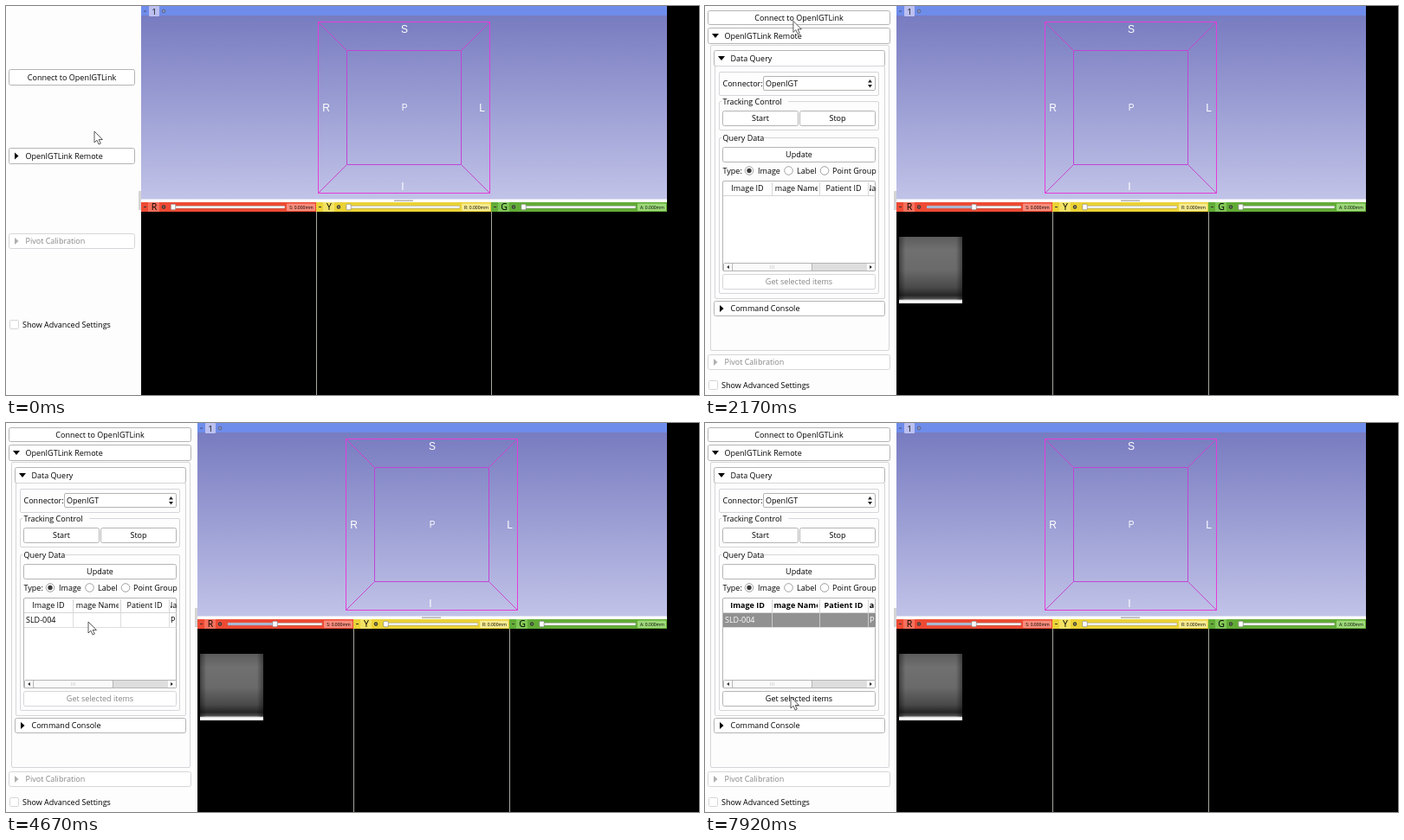
Recreate the animation shown at these times as an HTML page. Size 800 px wide and 450 px high, loop 8000 ms.

```html
<!DOCTYPE html>
<html lang="en">
<head>
<meta charset="utf-8">
<style>
html, body { margin: 0; width: 100%; height: 100%; overflow: hidden; background: #000; }
svg { display: block; width: 100vw; height: 100vh; }
text { font-family: "Open Sans", "Noto Sans", sans-serif; font-size: 9px; fill: #000; white-space: pre; }
.mid { text-anchor: middle; }
.off { fill: #858585; }
.bold { font-weight: 700; }
.lit { fill: #fff; }
.view { font-family: "Liberation Sans", Arial, sans-serif; font-size: 12px; fill: #fff; text-anchor: middle; }
.back { font-size: 10px; }
.letter { font-size: 10.5px; }
.tiny { font-size: 5px; text-anchor: middle; }
</style>
</head>
<body>
<svg viewBox="0 0 800 450" xmlns="http://www.w3.org/2000/svg">
  <defs>
    <linearGradient id="sky" x2="0" y2="1">
      <stop offset="0" stop-color="#7478be"/>
      <stop offset="1" stop-color="#c1c3e8"/>
    </linearGradient>
    <linearGradient id="scan" x2="0" y2="1">
      <stop offset="0" stop-color="#5c5c5c"/>
      <stop offset=".2" stop-color="#707070"/>
      <stop offset=".5" stop-color="#6a6a6a"/>
      <stop offset=".76" stop-color="#4a4a4a"/>
      <stop offset=".88" stop-color="#262626"/>
      <stop offset=".93" stop-color="#505050"/>
      <stop offset=".96" stop-color="#fff"/>
    </linearGradient>
    <linearGradient id="edge">
      <stop offset="0" stop-opacity=".4"/>
      <stop offset=".1" stop-opacity="0"/>
      <stop offset=".9" stop-opacity="0"/>
      <stop offset="1" stop-opacity=".4"/>
    </linearGradient>
    <clipPath id="stage"><rect width="763" height="450"/></clipPath>
    <clipPath id="narrow"><rect width="147" height="450"/></clipPath>
    <clipPath id="table"><rect x="20" y="202" width="177" height="106"/></clipPath>
    <clipPath id="heads">
      <rect x="80" y="203" width="50" height="16"/>
      <rect x="190" y="203" width="7" height="16"/>
    </clipPath>
  </defs>
  <g id="views" clip-path="url(#stage)"></g>
  <g id="panel"></g>
  <path id="cursor" d="M0 0V13L3 10.2L5.1 15L7.3 14L5.2 9.5H9.4Z" fill="#fff" stroke="#333" stroke-width=".8"/>
</svg>
<script>
const LOOP = 8000, STEP = 1000 / 12;
const LINE = '#b4b4b4', FAINT = '#d6d6da', PAPER = '#fdfdfd';
const $ = id => document.getElementById(id);

const rect = (x, y, r, b, fill, extra = '') =>
  `<rect x="${x}" y="${y}" width="${r - x}" height="${b - y}" fill="${fill}" ${extra}/>`;
const box = (x, y, r, b, stroke = LINE, fill = 'none', rx = 1.5) =>
  rect(x + .5, y + .5, r - .5, b - .5, fill, `stroke="${stroke}" rx="${rx}"`);
const path = (d, stroke, width = 1) => `<path d="${d}" fill="none" stroke="${stroke}" stroke-width="${width}"/>`;
const text = (x, y, s, cls = '') => `<text x="${x}" y="${y}" class="${cls}">${s}</text>`;
const shape = (d, fill) => `<path d="${d}" fill="${fill}"/>`;
const dot = (x, y, r, fill, stroke = 'none') =>
  `<circle cx="${x}" cy="${y}" r="${r}" fill="${fill}" stroke="${stroke}"/>`;

function button(x, y, r, b, label, on = true) {
  return box(x, y, r, b, on ? LINE : FAINT, '#fff', 2) +
    text((x + r) / 2, (y + b) / 2 + 3.2, label, on ? 'mid' : 'mid off');
}

function fold(x, y, r, b, label, open, on = true) {
  const cx = x + 9, cy = (y + b) / 2;
  const d = open ? `M${cx - 4} ${cy - 2.5}h8l-4 5z` : `M${cx - 2} ${cy - 4}v8l4.5-4z`;
  return box(x, y, r, b, on ? LINE : FAINT, '#fff', 2) + shape(d, on ? '#000' : '#b0b0b0') +
    text(x + 19.5, cy + 3.2, label, on ? '' : 'off');
}

function group(y, b, title) {
  return box(16, y, 201, b, FAINT) +
    (title ? rect(19, y - 3, 21 + title.length * 4.7, y + 4, PAPER) + text(20.5, y + 4, title) : '');
}

const radio = (x, on) => dot(x, 190.5, 4.8, '#fff', '#a0a0a0') + (on ? dot(x, 190.5, 2.7, '#3c3c3c') : '');

function scroller(x, y, r, from, to) {
  const m = (from + to) / 2;
  return box(x, y, r, y + 10, LINE, '#dedede') +
    rect(x + 1, y + 1, x + 10, y + 9, '#fff') + rect(r - 10, y + 1, r - 1, y + 9, '#fff') +
    box(from, y, to, y + 10, LINE, '#fafafa') +
    path(`M${m - 2} ${y + 3}v4m2-4v4m2-4v4`, FAINT, .8) +
    shape(`M${x + 7} ${y + 3}v4l-3-2zM${r - 7} ${y + 3}v4l3-2z`, '#333');
}

function table(s) {
  const picked = s.row > 1, bold = picked ? 'bold' : '', cell = picked ? 'lit' : '';
  let out = box(20, 202, 197, 307, LINE, '#fff') +
    path('M21 219.5H197M77.5 204V219M132.5 204V219M188.5 204V219', FAINT) +
    text(49, 214, 'Image ID', 'mid ' + bold) + text(160, 214, 'Patient ID', 'mid ' + bold) +
    `<g clip-path="url(#heads)">${text(105, 214, 'Image Name', 'mid ' + bold)}` +
    `${text(picked ? 182.5 : 185.5, 214, 'Na', bold)}</g>`;
  if (s.row) {
    if (picked) out += rect(21, 220, 197, 236, s.row === 2 ? '#4a86b4' : '#919191');
    out += path('M21 236.5H197M77.5 220V236M132.5 220V236M188.5 220V236', FAINT, .8) +
      text(23, 231.3, 'SLD-004', cell) + text(190, 231.3, 'P', cell);
  }
  return `<g clip-path="url(#table)">${out}${scroller(21, 297, 197, 31, 124)}</g>`;
}

function query(s) {
  const on = s.linked;
  return fold(10, 51, 208, 70, 'Data Query', true) + box(11, 69, 208, 339, FAINT) +
    group(76, 104) + text(20.5, 92.8, 'Connector:') + box(67, 81, 197, 98, LINE, '#fff') +
    text(70, 92.8, on ? 'OpenIGT' : 'None') + shape('M188 88.5h5l-2.5-3.5zM188 91h5l-2.5 3.5z', '#222') +
    group(110, 144, 'Tracking Control') +
    button(20, 121, 108, 139, 'Start', on) + button(109, 121, 197, 139, 'Stop', on) +
    group(152, 333, 'Query Data') + button(20, 163, 197, 181, 'Update', on) +
    text(20.5, 194, 'Type:') + radio(51, true) + text(61, 194, 'Image') +
    radio(96.5) + text(106, 194, 'Label') + radio(138) + text(147, 194, 'Point Group') +
    table(s) + button(20, 310, 197, 328, 'Get selected items', s.row > 1) +
    fold(10, 341, 208, 359, 'Command Console', false);
}

function panel(s) {
  const w = s.left, r = w - 7, open = s.phase > 0;
  const cy = open ? 5 : 73, ry = open ? 25 : 164, py = open ? 403 : 263, ay = open ? 433 : 363;
  let out = rect(0, 0, w, 450, PAPER) +
    button(3, cy, r, cy + (open ? 17 : 19), 'Connect to OpenIGTLink') +
    fold(3, ry, r, ry + 19, 'OpenIGTLink Remote', open);
  if (open) {
    const narrow = s.phase === 1;
    out += box(6, 45, narrow ? 148 : 213, 399, FAINT) +
      `<g ${narrow ? 'clip-path="url(#narrow)"' : ''}>${query(s)}</g>` +
      (narrow ? scroller(7, 388, 147, 17, 98) : '');
  }
  return out + fold(3, py, r, py + 18, 'Pivot Calibration', false, false) +
    box(4, ay, 15, ay + 11, FAINT, '#fff', 1) + text(19, ay + 8.8, 'Show Advanced Settings') +
    rect(w - 3, 214, w, 236, '#d4d4d4');
}

// Each run is the filled part of the groove, ending at a thumb
function sliceBar(x, r, letter, label, [base, light, pale], runs) {
  const end = r - 36;
  const thumbs = runs.map(([from, to]) => rect(from, 231.3, to, 234, '#a9b8d4') +
    rect(to - 2.7, 229.3, to + 2.7, 235.8, '#fff', 'stroke="#777" stroke-width=".6" rx="1"'));
  return rect(x, 227, r, 238, base) + rect(x + 8, 227, x + 21, 238, light) +
    path(`M${x + 3} 232.5h3`, '#333') + text(x + 15, 236.3, letter, 'mid letter') +
    dot(x + 26, 232.5, 2.2, '#3c3c3c') + dot(x + 26, 232.5, .8, light) +
    rect(x + 35, 231.3, end, 234, '#fff', 'stroke="#888" stroke-width=".5" rx="1"') + thumbs.join('') +
    rect(r - 34, 228.5, r - 1, 237, pale, 'rx="1"') + text(r - 17, 234.6, label, 'tiny');
}

function cube(dx) {
  return `<g transform="translate(${dx} 0)">` +
    path('M393.5 51.5L360.5 18.5M525.5 51.5L558.5 18.5M393.5 183.5L360.5 216.5M525.5 183.5L558.5 216.5', '#c844cc') +
    path('M393.5 51.5H525.5V183.5H393.5Z', '#c044d4') + path('M360.5 18.5H558.5V216.5H360.5Z', '#e63cd8') +
    text(460, 31, 'S', 'view') + text(369.5, 121.5, 'R', 'view') + text(549.5, 121.5, 'L', 'view') +
    text(460, 121, 'P', 'view back') + text(458, 212.5, 'I', 'view') + '</g>';
}

const scan = (x, r) => rect(x, 267, r, 344, 'url(#scan)') + rect(x, 267, r, 340, 'url(#edge)');

function views({ phase, left: x }) {
  const [a, b, end, dx] = [[358, 560, 763, 0], [423, 625, 828, 65], [401, 581, 763, 32]][phase];
  const runs = [[[191, 193]], [[191, 256], [283, 321]], [[256, 310.5]]][phase];
  const idle = s => [[s + 35, s + 37.5]];
  return rect(x, 0, 763, 224, 'url(#sky)') + rect(x, 0, 763, 11, '#6e8cea') +
    rect(x + 9, 0, x + 21, 12, '#bcc0f0', 'rx="1"') + path(`M${x + 3} 6h3`, '#444c70') +
    text(x + 15, 9.7, '1', 'mid') + dot(x + 26, 6, 1.9, '#8b94b8', '#5c6690') + cube(dx) +
    rect(x, 223.5, 763, 227, '#fff') + rect(448 + dx, 224.5, 470 + dx, 226, '#b0b0b0') +
    sliceBar(x, a, 'R', 'S: 0.000mm', ['#ee4a34', '#f5705c', '#f88c7c'], runs) +
    sliceBar(a, b, 'Y', 'R: 0.000mm', ['#ebd236', '#f3e264', '#f6ea90'], idle(a)) +
    sliceBar(b, end, 'G', 'A: 0.000mm', ['#62ac36', '#80c656', '#9cd878'], idle(b)) +
    path(`M${a + .5} 238V450M${b + .5} 238V450`, '#a8a8a0') +
    ['', scan(170, 243) + scan(283, 308), scan(224, 297)][phase];
}

// Cursor stops: time, x, y
const route = [
  [0, 102, 145], [250, 101, 169], [500, 99, 168], [830, 101, 160], [1330, 107, 107], [1667, 103, 14],
  [2083, 102, 14], [3000, 97, 160], [3333, 98, 170], [4083, 98, 170], [4670, 95, 230],
  [5083, 95, 229], [5667, 99, 317], [LOOP, 99, 317]
];

function pointer(t) {
  const i = route.findIndex((p, k) => k && t <= p[0]);
  const [t0, x0, y0] = route[i - 1], [t1, x1, y1] = route[i];
  const u = (t - t0) / (t1 - t0), e = u * u * (3 - 2 * u);
  return [x0 + (x1 - x0) * e, y0 + (y1 - y0) * e];
}

const count = (t, times) => times.filter(k => t >= k).length;

function stateAt(t) {
  const phase = count(t, [245, 660]);
  return { phase, left: phase < 2 ? 156 : 221, linked: t >= 2080, row: count(t, [3745, 5080, 6160]) };
}

let shown = '';
function draw(now) {
  const t = Math.floor((now % LOOP + 4) / STEP) * STEP % LOOP;
  const s = stateAt(t), key = JSON.stringify(s);
  if (key !== shown) {
    $('views').innerHTML = views(s);
    $('panel').innerHTML = panel(s);
    shown = key;
  }
  $('cursor').setAttribute('transform', `translate(${pointer(t).map(v => v.toFixed(1)).join(' ')})`);
}

const start = performance.now();
(function tick() {
  draw(performance.now() - start);
  requestAnimationFrame(tick);
})();
</script>
</body>
</html>
```
